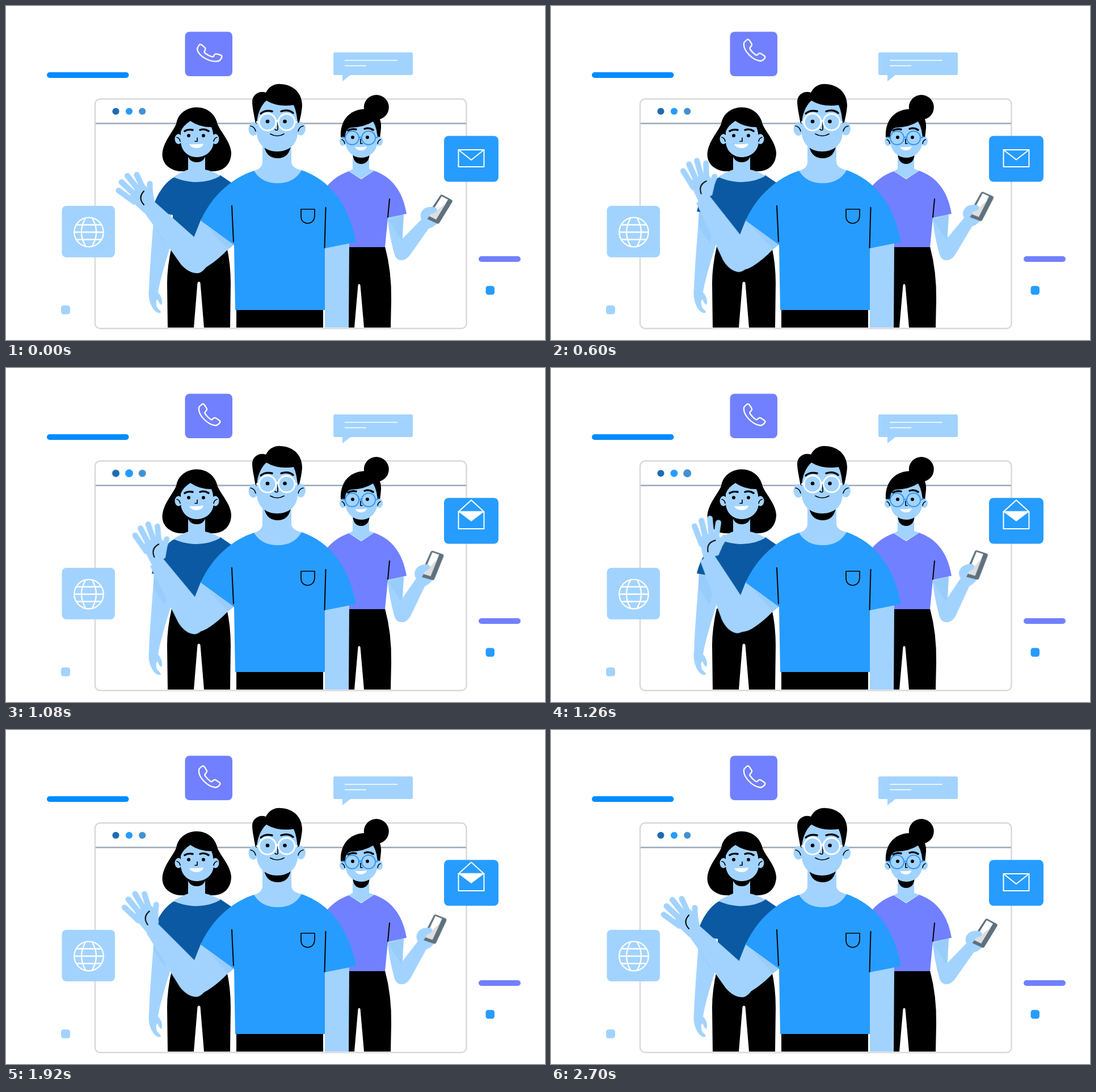
Write an HTML page without scripts that moves like this. It is 950x590 px and loops after 2760 ms.

```html
<!DOCTYPE html>
<html lang="en">
<head>
<meta charset="utf-8">
<title>Contact team</title>
<style>
  html, body { margin: 0; width: 100%; height: 100%; overflow: hidden; background: #fff; }
  svg { display: block; width: 950px; height: 590px; }

  .skin { fill: #a2d3ff; }
  .shade { fill: #98ccfb; }
  .blue { fill: #269cff; }
  .navy { fill: #0b59a2; }
  .violet { fill: #7180ff; }
  .white { fill: #fff; }
  .line { fill: none; stroke: #000; stroke-width: 2; stroke-linecap: round; stroke-linejoin: round; }
  .thin { stroke-width: 1.7; }
  .brow { stroke-width: 3.4; }
  .icon { fill: none; stroke: #fff; stroke-width: 2; stroke-linejoin: round; }
  .fingers { fill: none; stroke: #a2d3ff; stroke-width: 10; stroke-linecap: round; }

  .arm, .hand, .holder, .flap, .dot, .handset { animation: 2.76s cubic-bezier(.37, 0, .63, 1) infinite both; }
  .arm { animation-name: wave; transform-origin: 346px 425px; --turn: 15deg; }
  .hand { animation-name: wave; transform-origin: 264px 380px; --turn: 18deg; }
  .holder { animation-name: lift; transform-origin: 697px 430px; }
  .flap { animation-name: open; transform-origin: 820px 254px; }
  .dot { animation-name: pulse; transform-box: fill-box; transform-origin: center; }
  .handset { animation-name: ring; transform-origin: 358.5px 82.5px; }

  @keyframes wave {
    0%, 31.2%, 63.8%, 97.8%, 100% { transform: rotate(0deg); }
    15.8%, 45.7%, 48.6%, 82.2% { transform: rotate(var(--turn)); }
  }
  @keyframes lift {
    0%, 97.8%, 100% { transform: rotate(0deg); }
    48.9% { transform: rotate(-10.5deg); }
  }
  @keyframes open {
    0%, 21%, 82.4%, 100% { transform: scaleY(1); }
    31.9%, 68.8% { transform: scaleY(-1.15); }
  }
  @keyframes pulse {
    0%, 22%, 45%, 100% { transform: scale(1); }
    32% { transform: scale(1.15); }
  }
  @keyframes ring {
    0%, 8.7% { transform: rotate(-18deg); }
    4.3%, 13% { transform: rotate(12deg); }
    17.4% { transform: none; }
    19.6% { transform: translateY(-6px); }
    21.7% { transform: translateY(-4.5px); }
    25%, 100% { transform: none; }
  }
</style>
</head>
<body>
<svg viewBox="0 0 950 590">
  <!-- Browser window -->
  <rect x="157" y="164.3" width="654.5" height="405.5" rx="9" fill="#fff" stroke="#d9d9dc" stroke-width="2.5"/>
  <path d="M158 207.5H811" stroke="#9aa9b8" stroke-width="2.4"/>
  <circle class="dot" cx="193.5" cy="186" r="6.1" fill="#1e6bb0"/>
  <circle class="dot" cx="217" cy="186" r="6.1" fill="#269cff" style="animation-delay:.18s"/>
  <circle class="dot" cx="240.2" cy="186" r="6.1" fill="#4290d2" style="animation-delay:.36s"/>

  <!-- Loose accents -->
  <rect x="72" y="117" width="144.5" height="10" rx="5" fill="#008cff"/>
  <rect class="violet" x="833" y="442" width="74" height="10" rx="5"/>
  <rect class="blue" x="845.5" y="494.5" width="15.5" height="15.5" rx="4.5"/>
  <rect class="skin" x="97" y="529" width="16" height="15.5" rx="4.5"/>

  <!-- Left woman -->
  <path d="M336 179C318 179 303 190 300 208C295 222 276 240 275.5 263C276 280 290 291 308 292H365C385 292 397 278 397 259C396 240 378 222 373 209C369 191 355 179 336 179Z"/>
  <path class="skin" d="M261 362C258 410 254 450 252 500C250 515 254 528 261 537C266 543 271 543 273 541C272 536 265 535 265 527C264 523 265 520 267 518C269 523 271 527 274 528C277 520 273 511 268 506C272 480 285 440 291 420V366Z"/>
  <path class="shade" d="M261 365L260 387Q270 406 280 418L290 372Z"/>
  <path d="M292 425H389Q396 455 396 490L395 568H349L342.5 489Q340 485 337.5 489L331 568H285L284 490Q284 460 292 425Z"/>
  <path class="navy" d="M295 303C279 313 264 334 257 363L294 369V425H330L400 385V314L378 299Z"/>
  <path class="skin" d="M321 262V289Q309 293 295 302Q314 311 337 311Q362 310 378 300Q365 292 351 289V262Z"/>
  <path d="M319 258Q321 276 336 276Q351 276 353 258Z"/>
  <g class="skin">
    <ellipse cx="304" cy="235" rx="6.5" ry="9"/>
    <ellipse cx="369" cy="235" rx="6.5" ry="9"/>
    <path d="M308 222Q312 211 325 203Q340 214 362 214Q366 222 366 240C365 257 351 267 336 267C322 267 309 257 308 240Z"/>
  </g>
  <path class="line thin" d="M301 232Q306 233 307 239M372 232Q367 233 366 239M337 233V239H333"/>
  <path class="line brow" d="M315 221Q321 217 329 219M342 219Q350 216 357 221"/>
  <circle cx="322" cy="229" r="3"/><circle cx="348" cy="229" r="3"/>
  <path class="white" d="M323 244Q336 245 348 243Q346 251 336 251Q326 251 323 244Z"/>

  <!-- Right woman -->
  <circle cx="652.8" cy="179" r="22"/>
  <path d="M590 232C588 205 603 183 632 182C653 183 662 198 661 215L659 234Z"/>
  <path d="M600 425H668Q680 470 679 520L678 568H631L624.5 493Q622.5 489 620.5 493L614 568H600Z"/>
  <path class="skin" d="M672 372L701 368L699 412L710 440Q705 449 697 449Q687 449 684 436Q676 408 672 372Z"/>
  <path class="shade" d="M674 378L701 369L697 414Z"/>
  <path class="violet" d="M604 292L626 306L649 291C679 302 699 325 706 367L673 374L668 426H600L566 318C577 305 590 297 604 292Z"/>
  <path class="line" d="M676 341L673 373"/>
  <path class="skin" d="M611 262V288L604 292L626 305L649 291L640 288V262Z"/>
  <path d="M611 260Q612 279 626 279Q640 279 641 260Z"/>
  <g class="skin">
    <ellipse cx="594" cy="239" rx="6" ry="8"/>
    <ellipse cx="658" cy="239" rx="6" ry="8"/>
    <path d="M598 227Q600 217 607 215Q632 214 647 204Q655 217 655 239C654 257 640 268 627 268C611 268 599 256 598 240Z"/>
  </g>
  <path class="line thin" d="M592 236Q596 237 597 243M660 236Q656 237 655 243M625 235V243H628"/>
  <path class="line brow" d="M603 220Q609 216 617 218M632 217Q640 214 647 219"/>
  <circle cx="611" cy="232" r="3"/><circle cx="637" cy="232" r="3"/>
  <g fill="none" stroke="#3598f0" stroke-width="2">
    <path d="M592 232L598 233M622 233Q625 230 627 233M651 233L657 231"/>
    <circle cx="610" cy="233" r="12"/><circle cx="639" cy="233" r="12"/>
  </g>
  <path class="white" d="M615 249Q626 250 636 248Q634 255 626 255Q618 255 615 249Z"/>

  <!-- Hand with phone -->
  <g class="holder">
    <path class="skin" d="M697 413L732 377Q728 367 735 360Q743 353 752 357L764 375Q763 384 751 391L745 393L712 440Q705 449 697 449Q688 449 684 436Z"/>
    <path fill="#5f717e" d="M765 335Q767 332 770 334L785 342Q788 344 786 347L764 383Q762 386 759 384L742 376Q739 374 741 371Z"/>
    <path fill="#fff" d="M768 336L779 342L758 377L746 371Z"/>
    <path fill="#dededf" d="M775 349L758 377L746 371Z"/>
    <path class="skin" d="M734 361Q743 352 757 356Q762 359 758 364L749 368L741 378Z"/>
  </g>

  <!-- Man -->
  <path class="skin" d="M561 424L605 416L604 568H562Z"/>
  <rect x="406" y="534" width="153" height="34"/>
  <path class="skin" d="M344 376L331 409L321 450Q328 466 338 466Q347 465 355 460Q374 448 391 430L404 420Z"/>
  <path class="shade" d="M356 391L391 430L402 421Z"/>
  <g class="arm">
    <path class="skin" d="M262 346L335 411L360 450Q348 472 337 472Q322 472 308 456L244 365Z"/>
    <g class="hand">
      <path class="fingers" d="M198.5 326L226 346M203.5 311L232 338M214 300L239 332M230.5 298L244 328M253.5 314L254 344"/>
      <path class="skin" d="M217 340Q229 352 244 366L262 346L258 322Q250 324 246 317L222 327Z"/>
      <path class="line" d="M243 327Q232 339 243 351"/>
    </g>
  </g>
  <path class="blue" d="M437 291L521 290C561 304 602 338 617 417L562 428V537H404L402 422L343 379C364 333 400 303 437 291Z"/>
  <path class="line" d="M398 353L401 416M563.5 356L561.5 427"/>
  <path class="line thin" d="M520 359H544V371Q543 383 532 384Q520 383 520 371Z"/>
  <path class="skin" d="M452 240V275Q452 287 437 291Q450 313 479 313Q508 313 521 290Q503 286 503 275V240Z"/>
  <path d="M454 240Q456 269 479 269Q501 269 503 240Z"/>
  <path d="M440 209C437 190 434 180 434 168C435 155 448 149 458 153C464 141 475 137 484 138C508 139 522 155 522 176C521 190 518 200 516 210Z"/>
  <g class="skin">
    <ellipse cx="436" cy="217" rx="8.5" ry="12"/>
    <ellipse cx="519.5" cy="216.5" rx="8.5" ry="12"/>
    <path d="M442 208C443 190 449 176 459 167Q478 179 507 175Q513 188 514 210V225C513 245 498 257 478 257C458 257 443 244 442 225Z"/>
  </g>
  <path class="line thin" d="M431 212Q438 213 440 221M524 212Q517 213 515 221M479 206V218Q478 221 474 218M466 226Q478 233 490 226"/>
  <path class="line brow" d="M449 190Q457 183 469 186M485 186Q498 182 506 189"/>
  <circle cx="461" cy="204" r="3.3"/><circle cx="491.5" cy="204" r="3.3"/>
  <g class="icon" style="stroke-width:2.8">
    <circle cx="461" cy="205" r="15"/><circle cx="494.5" cy="205" r="14.5"/>
    <path d="M475.5 204Q478 201 480.5 204M441 205H446M509 205H514"/>
  </g>

  <!-- Call card -->
  <rect class="violet" x="315.5" y="45.5" width="83.5" height="78.5" rx="8"/>
  <path class="icon handset" style="stroke-width:2.3" d="M341 68L345.5 64Q348 62.5 350 65.5L353.5 71Q355 74 352 76.5Q349.5 78.5 351 81Q355 87 361 91Q363 92 365 89.5Q367 87 370 88.5L376 92.5Q378.5 94.5 376.5 97Q373 101.5 368.5 101.5Q358 100 348.5 90Q339 79.5 340 71Q340 69 341 68Z"/>

  <!-- Chat bubble -->
  <path class="skin" d="M580 82H714Q717 82 717 85V119Q717 122 714 122H607L593 133V122H580Q577 122 577 119V85Q577 82 580 82Z"/>
  <path class="icon" style="stroke-width:1.7" d="M597 96H690M597 105.500H635"/>

  <!-- Mail card -->
  <rect class="blue" x="772" y="229.5" width="96" height="81" rx="8"/>
  <path class="icon" d="M797.5 254H842.5V284H797.5Z"/>
  <path class="white" d="M797.5 254H842.5L820 271Z"/>
  <path class="icon flap" vector-effect="non-scaling-stroke" style="fill:#269cff" d="M797.5 254H842.5L820 272Z"/>

  <!-- Web card -->
  <rect class="skin" x="98.5" y="353" width="93.5" height="91" rx="8"/>
  <g class="icon" style="stroke-width:2.3">
    <circle cx="146" cy="399.5" r="25.8"/>
    <path d="M120 399.5H172M124 386.5H168M124 412.5H168"/>
    <path d="M140 375Q126 399 140 424M152 375Q166 399 152 424">
      <animate attributeName="d" dur=".69s" repeatCount="indefinite" keyTimes="0;.12;.22;.34;.46;1"
        values="M140 375Q126 399 140 424M152 375Q166 399 152 424;M140 375Q104 399 140 424M152 375Q188 399 152 424;M133 377Q143 399 133 422M159 377Q149 399 159 422;M133 377Q143 399 133 422M159 377Q149 399 159 422;M140 375Q126 399 140 424M152 375Q166 399 152 424;M140 375Q126 399 140 424M152 375Q166 399 152 424"/>
    </path>
  </g>
</svg>
</body>
</html>
```
